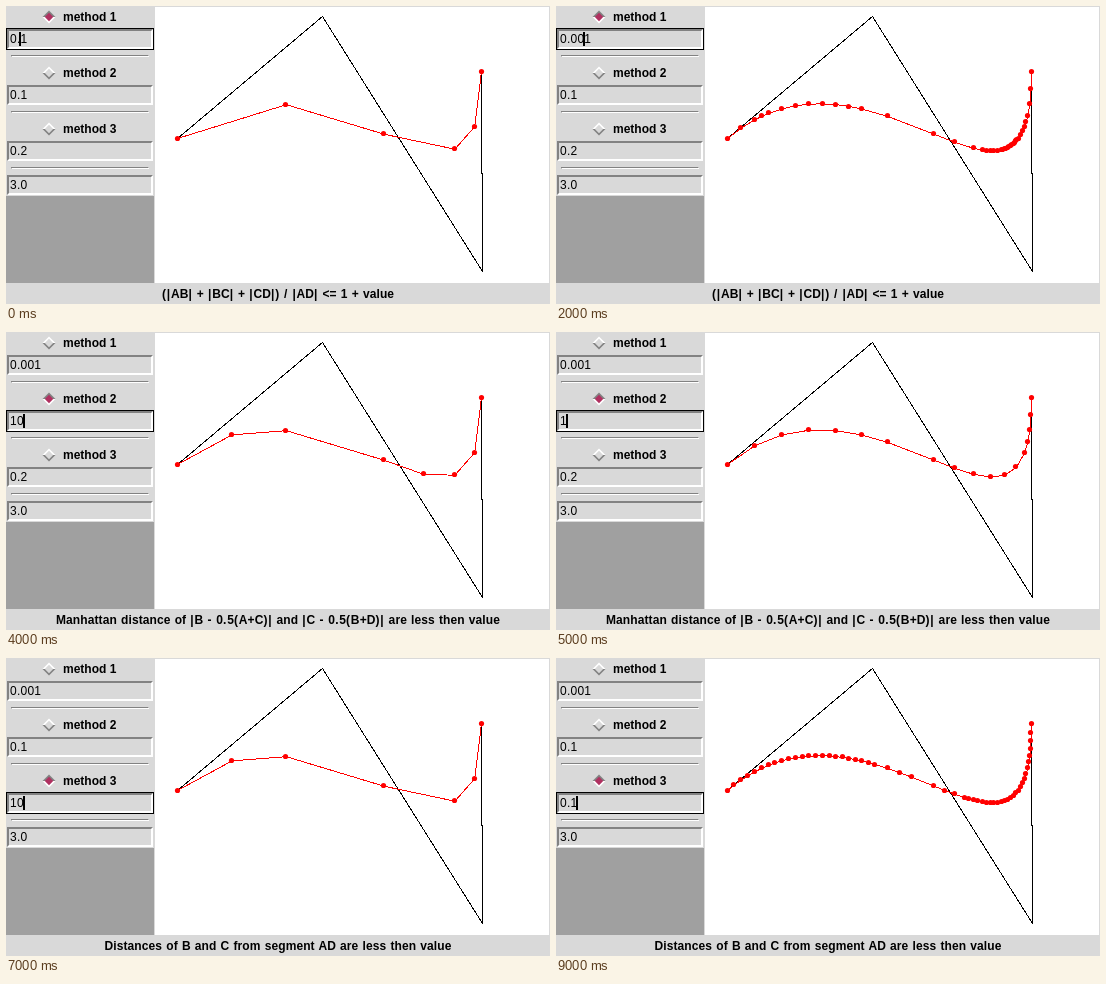
Write an HTML page that moves like this. It is 544x298 px and loops after 10000 ms.

```html
<!DOCTYPE html>
<html lang="en">
<head>
<meta charset="utf-8">
<title>Curve flattening methods</title>
<style>
  html, body { margin: 0; width: 100%; height: 100%; overflow: hidden; background: #d9d9d9; }
  svg { display: block; }
  text { font: 12px "Liberation Sans", Arial, sans-serif; white-space: pre; }
  .bold { font-weight: bold; }
  .field { letter-spacing: .25px; }
  .caption { text-anchor: middle; letter-spacing: .1px; word-spacing: .7px; }
  .sign { letter-spacing: .8px; }
  .line { fill: none; shape-rendering: crispEdges; }
  rect { shape-rendering: crispEdges; }
</style>
</head>
<body>
<svg id="stage" width="544" height="298" viewBox="0 0 544 298"></svg>
<script>
const stage = document.getElementById('stage');
const control = [[171, 132], [316, 10], [476, 265], [475, 65]];
const captions = [
  '(|AB| + |BC| + |CD|) / |AD| <= 1 + value',
  'Manhattan distance of |B - 0.5(A+C)| and |C - 0.5(B+D)| are less then value',
  'Distances of B and C from segment AD are less then value'
];
// One step per second: active method, the three field values, caret index.
const STEP = 1000;
const steps = [
  [0, ['0.1', '0.1', '0.2'], 2],
  [0, ['0.01', '0.1', '0.2'], 3],
  [0, ['0.001', '0.1', '0.2'], 4],
  [0, ['0.0001', '0.1', '0.2'], 5],
  [1, ['0.001', '10', '0.2'], 2],
  [1, ['0.001', '1', '0.2'], 1],
  [1, ['0.001', '0.1', '0.2'], 3],
  [2, ['0.001', '0.1', '10'], 2],
  [2, ['0.001', '0.1', '1'], 1],
  [2, ['0.001', '0.1', '0.1'], 3]
];

const mid = (p, q) => [(p[0] + q[0]) / 2, (p[1] + q[1]) / 2];
const dist = (p, q) => Math.hypot(p[0] - q[0], p[1] - q[1]);
const manhattan = (p, q) => Math.abs(p[0] - q[0]) + Math.abs(p[1] - q[1]);

function segmentDist(p, a, d) {
  const [dx, dy] = [d[0] - a[0], d[1] - a[1]];
  const along = ((p[0] - a[0]) * dx + (p[1] - a[1]) * dy) / (dx * dx + dy * dy);
  const t = Math.min(1, Math.max(0, along));
  return dist(p, [a[0] + t * dx, a[1] + t * dy]);
}

const isFlat = [
  ([a, b, c, d], v) => dist(a, b) + dist(b, c) + dist(c, d) <= (1 + v) * dist(a, d),
  ([a, b, c, d], v) => manhattan(b, mid(a, c)) < v && manhattan(c, mid(b, d)) < v,
  ([a, b, c, d], v) => segmentDist(b, a, d) < v && segmentDist(c, a, d) < v
];

// Halves the curve until each piece is flat; returns the end of every piece.
function flatten(curve, flat, value, depth = 0) {
  const [a, b, c, d] = curve;
  if (depth > 9 || flat(curve, value)) return [d];
  const ab = mid(a, b), bc = mid(b, c), cd = mid(c, d);
  const abc = mid(ab, bc), bcd = mid(bc, cd), m = mid(abc, bcd);
  return [
    ...flatten([a, ab, abc, m], flat, value, depth + 1),
    ...flatten([m, bcd, cd, d], flat, value, depth + 1)
  ];
}

const rect = (x, y, w, h, fill) =>
  `<rect x="${x}" y="${y}" width="${w}" height="${h}" fill="${fill}"/>`;
const label = (x, y, cls, content) => `<text x="${x}" y="${y}" class="${cls}">${content}</text>`;
const polyline = (points, color) =>
  `<polyline class="line" stroke="${color}" points="${points.map(([x, y]) => `${x + .5},${y + .5}`).join(' ')}"/>`;

function sunken(x, y, w, h, border) {
  return rect(x, y, w, h, '#fff') +
    `<path fill="#828282" d="M${x} ${y}h${w}l${-border} ${border}H${x + border}V${y + h - border}l${-border} ${border}z"/>`;
}

function entry(y, value, focused, caret) {
  let out = rect(0, y, 148, 22, focused ? '#000' : '#d9d9d9') +
    sunken(1, y + 1, 146, 20, 2) + rect(3, y + 3, 142, 16, '#d9d9d9') +
    label(4, y + 15, 'field', value);
  if (focused) {
    const advance = [...value.slice(0, caret)].reduce((sum, ch) => sum + (ch === '.' ? 3 : 7), 0);
    out += rect(3 + advance, y + 4, 2, 14, '#000');
  }
  return out;
}

function radio(y, selected) {
  const [top, bottom] = selected ? ['#828282', '#fff'] : ['#fff', '#828282'];
  return `<g transform="translate(43 ${y + 11})">
    <path fill="${top}" d="M-6.5 0L0-6.5L6.5 0z"/>
    <path fill="${bottom}" d="M-6.5 0L0 6.5L6.5 0z"/>
    <path fill="${selected ? '#b03060' : '#d9d9d9'}" d="M-4.2 0L0-4.2L4.2 0L0 4.2z"/></g>`;
}

function captionText(text) {
  const escaped = text.replace('<', '&lt;');
  return escaped.replace(/[|()\-.\/]/g, '<tspan class="sign">$&</tspan>');
}

function scene([active, values, caret]) {
  let out = rect(0, 0, 544, 298, '#d9d9d9') + rect(0, 190, 148, 87, '#a0a0a0') +
    rect(149, 1, 394, 276, '#fff');
  values.forEach((value, i) => {
    const y = i * 56;
    out += radio(y, i === active) + label(57, y + 15, 'bold', `method ${i + 1}`) +
      entry(y + 22, value, i === active, caret) + sunken(5, y + 49, 138, 2, 1);
  });
  out += entry(168, '3.0', false);

  const points = [control[0], ...flatten(control, isFlat[active], +values[active])];
  out += polyline(control, '#000') + polyline(points, '#f00');
  out += points.map(([x, y]) =>
    `<circle cx="${Math.floor(x) + .5}" cy="${Math.floor(y) + .5}" r="2.6" fill="#f00"/>`).join('');
  return out + label(272, 292, 'bold caption', captionText(captions[active]));
}

let shown = -1;
function draw() {
  const index = Math.floor(performance.now() / STEP) % steps.length;
  if (index !== shown) {
    stage.innerHTML = scene(steps[index]);
    shown = index;
  }
  requestAnimationFrame(draw);
}
draw();
</script>
</body>
</html>
```
